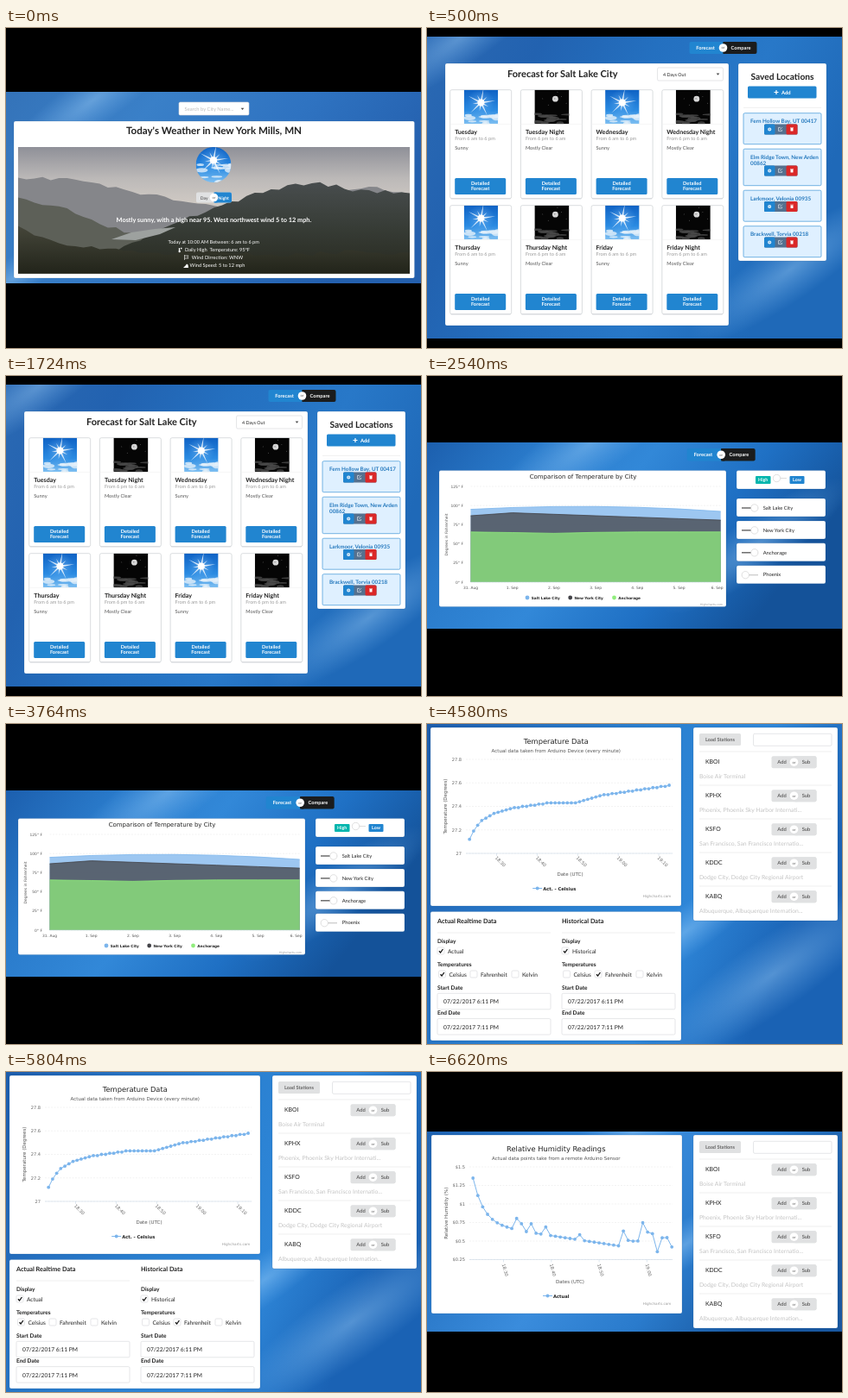
These frames come from a looping animation (480 px wide and 371 px high, 8 s). An HTML page:

```html
<!DOCTYPE html>
<html lang="en">
<head>
<meta charset="utf-8">
<title>Weather dashboard</title>
<style>
html, body { margin: 0; width: 100%; height: 100%; overflow: hidden; background: #000; }
svg { display: block; }
text { text-rendering: geometricPrecision; white-space: pre; }
.lato { font-family: Lato, sans-serif; }
.chart { font-family: "DejaVu Sans", sans-serif; }
</style>
</head>
<body>
<svg id="stage" width="480" height="371" viewBox="0 0 480 371"></svg>
<script>
const BLUE = '#2185d0', INK = '#222', GREY = '#e0e1e2', LINE = '#7cb5ec';
const many = (list, fn) => list.map(fn).join('');
const range = n => [...Array(n).keys()];
const random = seed => () => (seed = seed * 16807 % 2147483647) / 2147483647;

const rect = (x, y, w, h, fill, r = 0, more = '') =>
  `<rect x="${x}" y="${y}" width="${w}" height="${h}" rx="${r}" fill="${fill}" ${more}/>`;
const circle = (x, y, r, fill, more = '') => `<circle cx="${x}" cy="${y}" r="${r}" fill="${fill}" ${more}/>`;
const poly = (points, fill, more = '') => `<polygon points="${points}" fill="${fill}" ${more}/>`;
const path = (d, color, w = .5, more = '') => `<path d="${d}" fill="none" stroke="${color}" stroke-width="${w}" ${more}/>`;
const write = (cls, anchor, weight) => (x, y, s, size, fill = INK, more = '') =>
  `<text class="${cls}" x="${x}" y="${y}" font-size="${size}" fill="${fill}" text-anchor="${anchor}" font-weight="${weight}" ${more}>${s}</text>`;
const text = write('lato', 'start', 400), bold = write('lato', 'start', 700);
const mid = write('lato', 'middle', 400), boldMid = write('lato', 'middle', 700);
const label = write('chart', 'middle', 400), labelEnd = write('chart', 'end', 400);
const labelStart = write('chart', 'start', 400), legend = write('chart', 'start', 700);

const card = (x, y, w, h) => rect(x, y, w, h, '#fff', 2, 'stroke="#1b4f8a" stroke-opacity=".3" stroke-width=".6"');
const box = (x, y, w, h) => rect(x, y, w, h, '#fff', 1.5, 'stroke="#d4d5d8" stroke-width=".6"');
const arrow = (x, y) => poly(`${x - 1.8},${y - 1} ${x + 1.8},${y - 1} ${x},${y + 1.2}`, '#444');
const rule = (x, y, w, color = '#dcdcdc') => path(`M${x} ${y}h${w}`, color);
const knob = (x, y) => circle(x, y, 4.2, '#fff', 'stroke="#ccc" stroke-width=".6"');
const dashes = (x, y) => path(`M${x} ${y}H${x < 50 || x === 49 ? 284 : 340}`, '#ddd', .4, 'stroke-dasharray="2 1.5"');

// Sky backdrop: a linear gradient with soft diagonal streaks [x, y, length]
let skies = 0;
function sky(y, h, colors, streaks) {
  const id = 'sky' + skies++;
  const stops = many(colors, (c, i) => `<stop offset="${i / (colors.length - 1)}" stop-color="${c}"/>`);
  return `<linearGradient id="${id}" x2="1" y2=".35">${stops}</linearGradient>
    <svg y="${y}" width="480" height="${h}">${rect(0, 0, 480, h, `url(#${id})`)}` +
    many(streaks, ([cx, cy, r]) =>
      `<ellipse rx="${r}" ry="${r / 4}" fill="url(#light)" transform="translate(${cx} ${cy}) rotate(-35)"/>`) + '</svg>';
}

function split(x, y, w, h, names, fills, inks, size = 5.8) {
  const cx = x + w / 2, cy = y + h / 2;
  return rect(x, y, w, h, fills[0], 2) + rect(cx, y, w / 2, h, fills[1], 2) + rect(cx, y, 4, h, fills[1]) +
    boldMid(x + w / 4 - 1, cy + 2, names[0], size, inks[0]) +
    boldMid(cx + w / 4 + 1, cy + 2, names[1], size, inks[1]) +
    circle(cx, cy, 4.8, '#fff') + boldMid(cx, cy + 1.4, 'or', 4.2, '#888');
}
const viewSwitch = (x, y, w, h) =>
  split(x, y, w, h, ['Forecast', 'Compare'], [BLUE, '#1b1c1d'], ['#fff', '#fff'], 5.7);

function clouds(top, color, seed) {
  const rnd = random(seed);
  return many(range(14), () => {
    const y = top + rnd() * (40 - top);
    return `<ellipse cx="${rnd() * 40}" cy="${y}" rx="${3 + rnd() * 6}" ry="${.8 + rnd() * 2.2}" fill="${color}" opacity=".8"/>`;
  });
}
function sunny(x, y, size, cloudTop) {
  const rays = many(range(10), i => poly(`-1.2,0 0,${i % 2 ? -10 : -17} 1.2,0`, '#fff', `transform="rotate(${i * 36 + 10})" opacity=".8"`));
  return `<svg x="${x}" y="${y}" width="${size}" height="${size}" viewBox="0 0 40 40">${rect(0, 0, 40, 40, 'url(#day)')}
    ${clouds(cloudTop, '#e4f1fb', 77)}${circle(20, 15, 16, 'url(#light)')}<g transform="translate(20 15)">${rays}</g>${circle(20, 15, 4, '#fff')}</svg>`;
}
function night(x, y) {
  const rnd = random(5);
  const stars = many(range(6), () => circle(rnd() * 40, rnd() * 26, .4, '#aaa'));
  return `<svg x="${x}" y="${y}" width="40" height="39.5">${rect(0, 0, 40, 40, '#050505')}
    ${clouds(28, '#4a4a4a', 31)}${stars}${circle(24, 10.5, 3.4, '#d8d8d8')}${circle(23.3, 10, 1, '#aaa')}</svg>`;
}

// Heights are spread evenly over the photo, with small seeded crags between them
function ridge(heights, fill, seed) {
  const rnd = random(seed), fine = 6, n = (heights.length - 1) * fine;
  const points = range(n + 1).map(i => {
    const k = Math.min(Math.floor(i / fine), heights.length - 2), f = i / fine - k;
    const y = heights[k] + (heights[k + 1] - heights[k]) * f + (rnd() - .5) * 5;
    return `${14 + 453 * i / n},${Math.min(y, 284.5)}`;
  });
  return poly(`14,284.5 ${points.join(' ')} 467,284.5`, fill);
}

function today() {
  const photo = rect(14, 138, 453, 146.5, 'url(#haze)') +
    ridge([176, 174, 186, 197, 207, 204, 194, 184, 190], '#85868a', 11) +
    ridge([199, 211, 233, 250, 260, 266, 270, 274, 280], '#5d6058', 23) +
    ridge([284, 275, 259, 233, 208, 190, 178, 189, 190], 'url(#ridge)', 3) +
    poly('122,245 145,237 172,233 196,231 178,239 150,246', '#9da19f') +
    ridge([232, 250, 258, 262, 258, 264, 262, 258, 262], 'url(#front)', 41);
  const lines = ['Daily High &#160;Temperature: 95°F', 'Wind Dirrection: WNW', 'Wind Speed: 5 to 12 mph'];
  return sky(74, 222, ['#3473b9', '#3a80c8', '#2f73c1', '#2460ae'], [[100, 10, 120], [10, 215, 90]]) +
    box(200, 86, 81, 15) + text(206.5, 95.5, 'Search by City Name...', 5.8, '#bbb') + arrow(273.5, 93.8) +
    card(9, 108, 463.5, 182) + boldMid(240.5, 123.4, 'Today\'s Weather in New York Mills, MN', 11.6) + photo +
    `<g clip-path="url(#disc)">${sunny(219.5, 138, 41, 20)}</g>` +
    split(220, 190.5, 41, 12, ['Day', 'Night'], [GREY, BLUE], ['#666', '#fff'], 5) +
    boldMid(240.4, 225.4, 'Mostly sunny, with a high near 95. West northwest wind 5 to 12 mph.', 7.33, '#fff') +
    mid(240.2, 250.2, 'Today at 10:00 AM Between: 6 am to 6 pm', 5.6, '#fff') +
    many(lines, (s, i) => mid(244.5, 259.4 + i * 9, s, 5.7, '#fff')) +
    path('M200.5 255v3M202 255.5h1.5', '#fff', 1.3) + circle(200.7, 259, 1.2, '#fff') +
    path('M206.5 263v6M206.5 264h4.5l-1 1.5 1 1.5h-4.5', '#fff', .6) +
    poly('205,278 208,275 209,273.5 210.5,274.5 211,278', '#fff');
}

function forecast() {
  const days = ['Tuesday', 'Wednesday', 'Thursday', 'Friday'];
  const dayCard = i => {
    const x = 26.7 + (i % 4) * 81.7, y = i < 4 ? 71.7 : 205.7, dark = i % 2;
    return rect(x, y, 71, 126, '#fff', 2, 'stroke="#d0d3d6" stroke-width=".8"') + rule(x + 1, y + 126.3, 69, '#bfc3c8') +
      (dark ? night(x + 16, y) : sunny(x + 16, y, 39.5, 30)) + rule(x, y + 39.8, 71, '#eee') +
      bold(x + 5.5, y + 50.8, days[i >> 1] + (dark ? ' Night' : ''), 7.1) +
      text(x + 5.5, y + 58.5, dark ? 'From 6 pm to 6 am' : 'From 6 am to 6 pm', 5.6, '#999') +
      text(x + 5.5, y + 68.9, dark ? 'Mostly Clear' : 'Sunny', 5.7, '#555') +
      rect(x + 5.5, y + 102.2, 59, 19, BLUE, 1.5) +
      boldMid(x + 35, y + 110.4, 'Detailed', 5.7, '#fff') + boldMid(x + 35, y + 116.3, 'Forecast', 5.7, '#fff');
  };
  let top = 98.7;
  const place = lines => {
    const y = top, h = 29.5 + 6.5 * lines.length, by = y + h - 23.3;
    top += h + 5.5;
    return rect(366, y, 90, h, '#dff0ff', 1.5, `stroke="${BLUE}" stroke-width=".6"`) +
      many(lines, (s, i) => bold(374, y + 11.3 + i * 7, s, 6.3, '#2478bd')) +
      rect(390, by, 38.5, 12, '#55718f', 1.5) + rect(390, by, 12.5, 12, BLUE, 1.5) + rect(415.5, by, 13, 12, '#db2828', 1.5) +
      circle(396.2, by + 6, 2, '#fff') + path(`M394.5 ${by + 6}h3.4M396.2 ${by + 4.4}v3.2`, BLUE, .4) +
      path(`M410.5 ${by + 6.5}v1.5h-4v-4h2.5M408 ${by + 6.7}l3-3`, '#dde4ec', .7) +
      rect(420.5, by + 4.7, 3, 3.5, '#fff', .4) + rule(420, by + 4.1, 4, '#fff');
  };
  const places = [['Fern Hollow Bay, UT 00417'], ['Elm Ridge Town, New Arden', '00862'], ['Larkmoor, Velonia 00935'], ['Brackwell, Torvia 00218']];
  return sky(10, 350, ['#2b69b3', '#2262b0', '#2470c0', '#2878c8', '#1f69b8'], [[40, 0, 130], [420, 270, 140]]) +
    viewSwitch(303.5, 16, 78, 14) + card(21, 41, 328, 304) + boldMid(156.8, 56.5, 'Forecast for Salt Lake City', 11) +
    box(266.5, 46, 76, 15) + text(273, 55.6, '4 Days Out', 5.3) + arrow(336.5, 53.5) + many(range(8), dayCard) +
    card(360, 41, 102, 229) + boldMid(411, 60.3, 'Saved Locations', 10.2) + rect(371, 67.5, 79.5, 14, BLUE, 1.5) +
    path('M401.5 74.5h5M404 72v5', '#fff', 1.2) + bold(410, 76.6, 'Add', 5.9, '#fff') + rule(366, 92.3, 90) + many(places, place);
}

function compare() {
  const cities = [
    ['Salt Lake City', LINE, i => 151.2 + .5 * (i - 2.6) ** 2, 116],
    ['New York City', '#434348', i => 158.6 + Math.max(3.4 * (1 - i), 1.7 * (i - 1)), 165.7],
    ['Anchorage', '#90ed7d', i => 180.8 + 1.6 * Math.exp(-((i - 1.9) ** 2)), 216.5]];
  const px = i => 50.5 + i * 48.2;
  const area = ([name, color, height, lx]) => {
    const top = range(7).map(i => `${px(i)},${height(i)}`).join(' ');
    return poly(`50.5,239 ${top} ${px(6)},239`, color, 'opacity=".75"') + path('M' + top, color, .8) +
      circle(lx, 257, 2.4, color) + legend(lx + 4.8, 258.7, name, 4.25);
  };
  const option = (name, i) => {
    const y = 142 + i * 25.9, on = i < cities.length;
    return card(358, y, 103, 21) + path(`M364 ${y + 11}h19`, on ? '#555' : '#ccc', 1.3) +
      knob(on ? 378.8 : 368.3, y + 11) + text(388.7, y + 12.7, name, 5.8);
  };
  return sky(77, 216, ['#1c5fae', '#2a7bcb', '#3288d8', '#1f70c4', '#145299'], [[190, 0, 150], [380, 120, 130]]) +
    viewSwitch(300.7, 84, 79, 14.5) + card(14, 109.5, 332, 158) +
    label(180.5, 119.3, 'Comparison of Temperature by City', 6.97) +
    many(range(6), i => dashes(50.5, 239 - i * 22.2) + labelEnd(42, 240.5 - i * 22.2, i * 25 + '° F', 4.4, '#555')) +
    many(cities, area) + rule(50.5, 239, 289.5, '#c0d0e0') +
    many(range(7), i => label(px(i) - (i === 6 ? 4 : 0), 246.5, i ? i + '. Sep' : '31. Aug', 4.4, '#555')) +
    label(0, 0, 'Degrees in Fahrenheit', 4.45, '#555', 'transform="translate(23.7 184) rotate(-90)"') +
    labelEnd(342, 265.7, 'Highcharts.com', 3.3, '#999') +
    card(358, 109.5, 103, 21.5) + rect(380, 116, 17.5, 9, '#00b5ad', 1) + boldMid(388.7, 122.4, 'High', 5.3, '#fff') +
    rect(419.5, 116, 17, 9, BLUE, 1) + boldMid(428, 122.4, 'Low', 5.3, '#fff') +
    path('M401 118.5h15', '#ddd', 1) + knob(404.5, 118.5) +
    many([...cities.map(c => c[0]), 'Phoenix'], option);
}

function stations(dy) {
  const rows = [['KBOI', 'Boise Air Terminal'], ['KPHX', 'Phoenix, Phoenix Sky Harbor Internati...'], ['KSFO', 'San Francisco, San Francisco Internatio...'],
    ['KDDC', 'Dodge City, Dodge City Regional Airport'], ['KABQ', 'Albuquerque, Albuquerque Internation...']];
  return `<g transform="translate(0 ${dy})">` + card(308, 4, 167, 224) + rect(315, 11, 48, 14, GREY, 1.5) +
    boldMid(339, 20, 'Load Stations', 5.7, '#666') + box(377.5, 11.3, 90.5, 14) +
    many(rows, ([code, name], i) => {
      const y = 32 + i * 39;
      return rule(315, y, 153) + text(322, y + 13.6, code, 6.9) + text(315, y + 30.5, name, 6.8, '#c4c4c4') +
        split(398.5, y + 5.2, 52, 14, ['Add', 'Sub'], [GREY, GREY], ['#666', '#666']);
    }) + '</g>';
}

// Shared frame of both line charts; ticks run from top to bottom
function lineChart(o) {
  const turn = (x, y, a) => `transform="translate(${x} ${y}) rotate(${a})"`;
  const base = o.top + o.gap * (o.ticks.length - 1), ly = o.y + 186.5;
  const points = range(o.count).map(i => [o.left + 4.2 + i * 231 / o.count * 1.02, o.height(i)]);
  return card(o.x, o.y, 290, 207) + label(149.3, o.y + 18.8, o.title, 8.3) + label(149.3, o.y + 29, o.note, 5.5, '#555') +
    many(o.ticks, (s, i) => dashes(o.left, o.top + i * o.gap) + labelEnd(o.left - 5, o.top + i * o.gap + 1.8, s, 5.1, '#666')) +
    rule(o.left, base, 284 - o.left, '#c0d0e0') +
    many(o.hours, (s, i) => path(`M${o.hx + i * o.hgap} ${base}v3`, '#c0d0e0') +
      labelStart(0, 0, s, 5.1, '#666', turn(o.hx + i * o.hgap - 2, base + 5.5, o.angle))) +
    label(0, 0, o.unit, 5.5, '#555', turn(o.x + 18.5, (o.top + base) / 2, -90)) + label(165.5, o.y + 172.3, o.dates, 5.5, '#555') +
    path('M' + points.join('L'), LINE, 1) + many(points, ([x, y]) => circle(x, y, 1.9, LINE)) +
    path(`M${o.lx - 5.5} ${ly}h11`, LINE, 1) + circle(o.lx, ly, 2, LINE) +
    legend(o.lx + 6.5, ly + 2, o.name, 5.2) + labelEnd(282.3, o.y + 197.3, 'Highcharts.com', 4.15, '#999');
}

function temperature() {
  // Quick warm-up, then a slow climb with a plateau, in whole hundredths of a degree
  const reading = i => Math.round(12 + 21.5 * (1 - Math.exp(-i / 2.8)) + .5 * i - 3.3 * Math.exp(-(((i - 26) / 4) ** 2)));
  const check = (x, y, s, on) => box(x, y, 8, 8) + (on ? path(`M${x + 2} ${y + 4.2}l1.6 1.8 2.8-4`, '#111', 1.3) : '') + text(x + 12, y + 6.6, s, 6.6);
  const form = (x, title, name, c, f) => bold(x, 231, title, 7.3) + rule(x, 242, 131) + bold(x, 254.3, 'Display', 6.5) +
    check(x, 259, name, true) + bold(x, 281.3, 'Temperatures', 6.5) +
    check(x + 1.5, 286, 'Celsius', c) + check(x + 38, 286, 'Fahrenheit', f) + check(x + 86, 286, 'Kelvin', false) +
    many([['Start Date', '6:11'], ['End Date', '7:11']], ([s, t], i) => {
      const y = 308 + i * 29.3;
      return bold(x, y, s, 6.5) + box(x, y + 4.3, 131, 18.5) + text(x + 7, y + 16.2, `07/22/2017 ${t} PM`, 6.7);
    });
  return sky(0, 371, ['#1c5cab', '#2570c0', '#2a80d0', '#2e86d8', '#1a62b4'], [[400, 290, 170], [300, 240, 110]]) +
    lineChart({ x: 4, y: 4, title: 'Temperature Data', note: 'Actual data taken from Arduino Device (every minute)',
      ticks: [27.8, 27.6, 27.4, 27.2, 27], left: 45, top: 41, gap: 27.25, hours: ['18:30', '18:40', '18:50', '19:00', '19:10'],
      hx: 80.5, hgap: 46.9, angle: 45, unit: 'Temperature (Degrees)', dates: 'Date (UTC)',
      lx: 127.7, name: 'Act. - Celsius', count: 50, height: i => 150 - reading(i) * 1.362 }) +
    card(4, 217.5, 290, 149.5) + form(12, 'Actual Realtime Data', 'Actual', true, false) +
    form(156, 'Historical Data', 'Historical', false, true) + stations(0);
}

function humidity() {
  // Decay towards a slow downward drift, with a few rises above it
  const rises = { 9: 13, 10: 8, 12: 10, 15: 9, 22: 6, 31: 18, 32: 8, 33: 8, 34: 9, 35: 31, 36: 21, 37: 20, 39: 17, 40: 18, 41: 8 };
  const height = i => 176 + .85 * i - 53 * Math.exp(-i / 2.2) - (rises[i] || 0);
  return sky(69, 232, ['#1f62b0', '#2a78c8', '#3a8cdc', '#2a7bcc', '#18579f'], [[240, 0, 150], [300, 130, 100]]) +
    lineChart({ x: 5, y: 73, title: 'Relative Humidity Readings', note: 'Actual data points take from a remote Arduino Sensor',
      ticks: ['$1.5', '$1.25', '$1', '$0.75', '$0.5', '$0.25'], left: 49, top: 110, gap: 21.5, hours: ['18:30', '18:40', '18:50', '19:00'],
      hx: 88.5, hgap: 55.3, angle: 74, unit: 'Relative Humidity (%)', dates: 'Dates (UTC)',
      lx: 139.5, name: 'Actual', count: 42, height }) + stations(69);
}

const fade = (id, stops, attrs = 'x2="0" y2="1"', tag = 'linearGradient') => `<${tag} id="${id}" ${attrs}>` +
  many(stops, ([at, c, a = 1]) => `<stop offset="${at}" stop-color="${c}" stop-opacity="${a}"/>`) + `</${tag}>`;
const defs = '<defs>' + fade('day', [[0, '#0f62c4'], [.6, '#2b8be2'], [1, '#7fc0f2']]) +
  fade('haze', [[0, '#8f9098'], [.25, '#bcb9b8'], [.45, '#d0cac4'], [1, '#a9a9a4']]) +
  fade('ridge', [[0, '#484d4e'], [.5, '#373c36'], [1, '#27291f']]) + fade('front', [[0, '#45463a'], [1, '#22241a']]) +
  fade('light', [[0, '#a8d8ff', .4], [1, '#8cc8ff', 0]], '', 'radialGradient') +
  `<clipPath id="disc">${circle(240, 158.5, 20.5, '#000')}</clipPath></defs>`;

const scenes = [today, forecast, compare, temperature, humidity], starts = [0, 500, 2540, 4580, 6620];
const stage = document.getElementById('stage');
stage.innerHTML = defs + many(scenes, draw => `<g class="scene">${draw()}</g>`);
const groups = [...stage.querySelectorAll('.scene')];

function tick() {
  const t = performance.now() % 8000;
  const now = starts.filter(s => s <= t).length - 1;
  groups.forEach((g, i) => g.style.display = i === now ? '' : 'none');
  requestAnimationFrame(tick);
}
tick();
</script>
</body>
</html>
```
